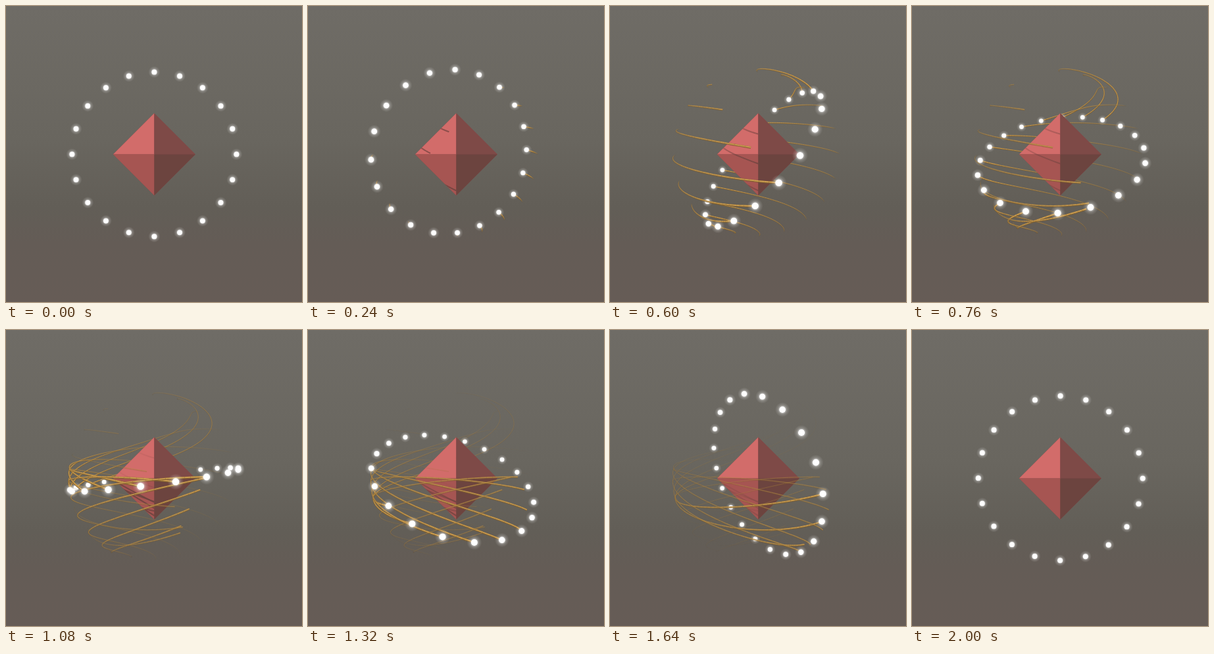
These frames come from a looping animation (450 px wide and 450 px high, 2040 ms). An HTML page with a canvas:

```html
<!DOCTYPE html>
<html lang="en">
<head>
<meta charset="utf-8">
<title>Orbiting lights</title>
<style>
html, body { margin: 0; width: 100%; height: 100%; overflow: hidden; background: #67645d; }
canvas { display: block; width: 450px; height: 450px; }
</style>
</head>
<body>
<canvas id="stage" width="450" height="450"></canvas>
<script>
const ctx = document.getElementById('stage').getContext('2d');
const LOOP = 2040, STEP = 40, SAMPLE = 10;
const C = 225.4, RING = 125, GEM = 62.5, CAMERA = 450, COUNT = 20;
const LIGHT = [-1, -0.4, 0.3];
const FADE = 1250;

const ease = t => { const p = t / LOOP; return p * p * (3 - 2 * p); };
const clamp = v => Math.max(0, Math.min(1, v));

// Ring point: spin on its own axis, tilt, then turn about the vertical.
function ringPoint(k, e) {
  const spin = k * Math.PI * 2 / COUNT - e * Math.PI / 2;
  const tilt = -e * Math.PI, turn = e * Math.PI * 3;
  const x = RING * Math.cos(spin), s = RING * Math.sin(spin);
  const y = s * Math.cos(tilt), z = s * Math.sin(tilt);
  return [
    x * Math.cos(turn) + z * Math.sin(turn),
    y,
    z * Math.cos(turn) - x * Math.sin(turn)
  ];
}

function project([x, y, z]) {
  const s = CAMERA / (CAMERA - z);
  return { x: C + x * s, y: C + y * s, s, z };
}

// Shadow of a point on the left face; up is -1 for the upper one, 1 for the lower.
function castShadow([x, y, z], up) {
  const gap = -x + up * y + z - GEM;
  const rate = -LIGHT[0] + up * LIGHT[1] + LIGHT[2];
  const d = gap / rate;
  if (d <= 0) return null;
  const hit = [x - LIGHT[0] * d, y - LIGHT[1] * d, z - LIGHT[2] * d];
  if (Math.abs(hit[0]) > 90 || Math.abs(hit[1]) > 90 || hit[2] < -30) return null;
  return project(hit);
}

function line(a, b, color, width, dy = 0) {
  ctx.strokeStyle = color;
  ctx.lineWidth = width;
  ctx.beginPath();
  ctx.moveTo(a.x, a.y + dy);
  ctx.lineTo(b.x, b.y + dy);
  ctx.stroke();
}

function buildTrails(t) {
  const trails = [];
  const outro = clamp((1930 - t) / 230);
  if (!outro) return trails;
  for (let j = 1; j < COUNT; j++) {
    const k = (j + 14) % COUNT, limit = 1.01 - j * 0.05;
    const parts = [];
    let prev = null;
    for (let u = 60; u <= t; u += SAMPLE) {
      const e = ease(u);
      if (e > limit) break;
      const p = ringPoint(k, e), v = project(p);
      const alpha = Math.pow(clamp(1 - (t - u) / FADE), 2) * clamp((u - 50) / 120) * outro;
      if (prev) parts.push({ p0: prev.p, p1: p, a: prev.v, b: v, alpha });
      prev = { p, v };
    }
    trails.push(parts);
  }
  return trails;
}

function drawTrails(trails, front) {
  for (const parts of trails) {
    for (const { a, b, alpha } of parts) {
      if ((b.z >= 0) !== front || alpha < 0.01) continue;
      const w = 2.2 * Math.pow(b.s, 1.5) * (0.4 + 0.6 * alpha);
      ctx.globalAlpha = alpha;
      line(a, b, '#80602f', w, 0.35);
      line(a, b, '#d0a152', w * 0.6, -0.2);
    }
  }
  ctx.globalAlpha = 1;
}

function drawDots(dots, front) {
  for (const { x, y, s, z } of dots) {
    if ((z >= 0) !== front) continue;
    const r = 9 * s;
    const glow = ctx.createRadialGradient(x, y, 0, x, y, r);
    glow.addColorStop(0, 'rgba(255,255,255,.75)');
    glow.addColorStop(0.42, 'rgba(255,255,255,.5)');
    glow.addColorStop(0.65, 'rgba(255,255,255,.17)');
    glow.addColorStop(1, 'rgba(255,255,255,0)');
    ctx.fillStyle = glow;
    ctx.beginPath();
    ctx.arc(x, y, r, 0, 7);
    ctx.fill();
    ctx.fillStyle = '#fff';
    ctx.beginPath();
    ctx.arc(x, y, 3.9 * s, 0, 7);
    ctx.fill();
  }
}

function facePath(sx, sy) {
  ctx.beginPath();
  ctx.moveTo(C, C);
  ctx.lineTo(C + sx * GEM, C);
  ctx.lineTo(C, C + sy * GEM);
  ctx.closePath();
}

function drawGem(trails) {
  // An underlay keeps the seams between faces closed.
  ctx.fillStyle = '#87494a';
  ctx.beginPath();
  ctx.moveTo(C, C - GEM);
  ctx.lineTo(C + GEM, C);
  ctx.lineTo(C, C + GEM);
  ctx.lineTo(C - GEM, C);
  ctx.fill();
  for (const [sx, sy, color] of [
    [-1, -1, '#d26c6a'], [1, -1, '#7e4a47'], [-1, 1, '#a65552'], [1, 1, '#6c443f']
  ]) {
    facePath(sx, sy);
    ctx.fillStyle = color;
    ctx.fill();
  }
  for (const up of [-1, 1]) {
    ctx.save();
    facePath(-1, up);
    ctx.clip();
    for (const parts of trails) {
      for (const { p0, p1, alpha } of parts) {
        if (alpha < 0.03) continue;
        const a = castShadow(p0, up), b = castShadow(p1, up);
        if (!a || !b) continue;
        ctx.globalAlpha = Math.min(0.85, alpha * 1.2);
        line(a, b, up < 0 ? '#7c4744' : '#6c433f', 2);
      }
    }
    ctx.restore();
  }
}

const sky = ctx.createLinearGradient(0, 0, 0, 450);
sky.addColorStop(0, '#6f6c66');
sky.addColorStop(0.45, '#69665f');
sky.addColorStop(0.68, '#625e57');
sky.addColorStop(0.8, '#645c56');
sky.addColorStop(1, '#665c56');

function draw(t) {
  ctx.fillStyle = sky;
  ctx.fillRect(0, 0, 450, 450);
  const e = ease(t), trails = buildTrails(t);
  const dots = Array.from({ length: COUNT }, (_, k) => project(ringPoint(k, e)));
  dots.sort((a, b) => a.z - b.z);
  drawTrails(trails, false);
  drawDots(dots, false);
  drawGem(trails);
  drawTrails(trails, true);
  drawDots(dots, true);
}

function tick() {
  const t = performance.now() % LOOP;
  draw(Math.floor(t / STEP) * STEP);
  requestAnimationFrame(tick);
}
tick();
</script>
</body>
</html>
```
